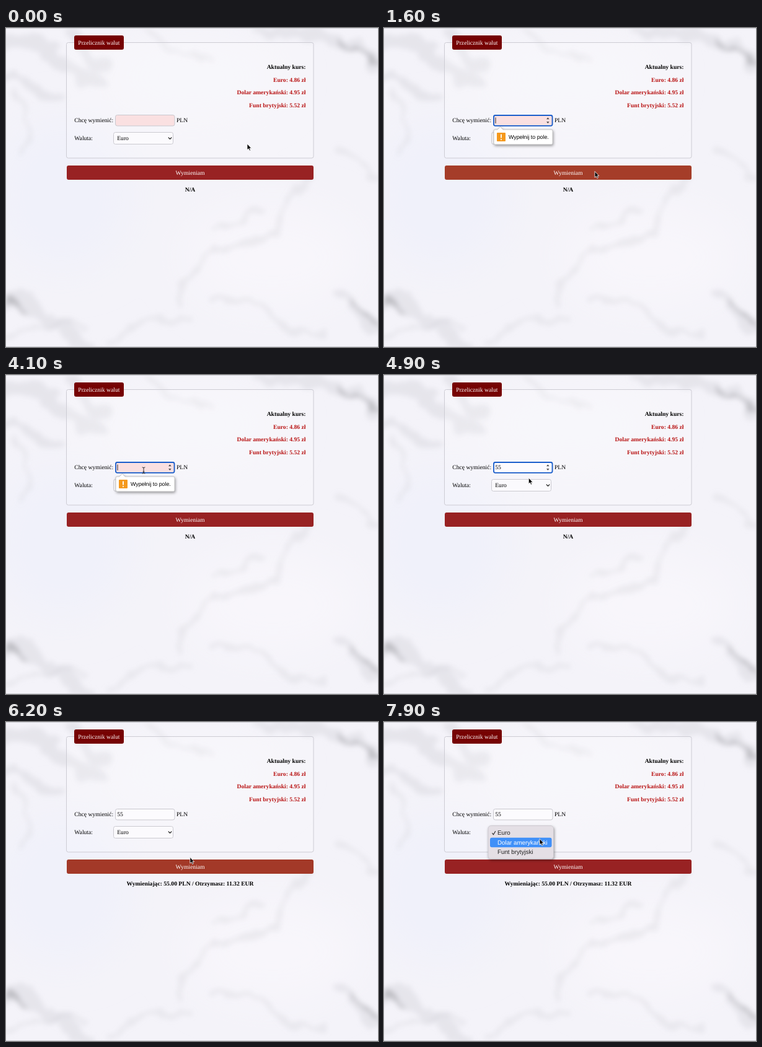
Write an HTML page that moves like this. It is 600 px wide and 515 px high and loops after 8000 ms.

```html
<!DOCTYPE html>
<html lang="pl">
<head>
<meta charset="utf-8">
<title>Przelicznik walut</title>
<style>
html, body { margin: 0; width: 100%; height: 100%; overflow: hidden; background: #f4f3f9; }
svg { display: block; width: 600px; height: 515px; }
text { font: 9.65px "Liberation Serif", "Times New Roman", serif; text-rendering: geometricPrecision; white-space: pre; }
.bold { font-weight: bold; }
.end { text-anchor: end; }
.mid { text-anchor: middle; }
.rate { fill: #b91515; }
.light { fill: #fff; }
.sans { font-family: "Liberation Sans", Arial, sans-serif; }
.line { fill: none; stroke: #222; stroke-linecap: round; stroke-linejoin: round; }
</style>
</head>
<body>
<svg viewBox="0 0 600 515">
  <defs>
    <filter id="marble" filterUnits="userSpaceOnUse" x="-30" y="-30" width="660" height="575">
      <feTurbulence type="fractalNoise" baseFrequency=".025" numOctaves="3" seed="4"/>
      <feDisplacementMap in="SourceGraphic" scale="38" xChannelSelector="R" yChannelSelector="G"/>
      <feGaussianBlur stdDeviation="4"/>
    </filter>
    <filter id="soft" x="-50%" y="-50%" width="200%" height="200%"><feGaussianBlur stdDeviation="35"/></filter>
    <filter id="shadow" x="-20%" y="-20%" width="140%" height="150%">
      <feDropShadow dx="1" dy="2" stdDeviation="2" flood-opacity=".4"/>
    </filter>
  </defs>

  <g filter="url(#soft)">
    <ellipse cx="90" cy="270" rx="110" ry="120" fill="#f0f1fa"/>
    <ellipse cx="430" cy="370" rx="140" ry="80" fill="#f8f6fb"/>
    <ellipse cx="300" cy="80" rx="140" ry="60" fill="#f6f5fa"/>
  </g>
  <g filter="url(#marble)" fill="none" stroke="#bdbdc4" stroke-linecap="round">
    <g stroke-width="20" opacity=".25">
      <path d="M0 25Q40 10 75 45T150 85M100 0L155 65M0 80L90 110"/>
      <path d="M410 5Q480 8 530 18T600 60"/>
      <path d="M0 445Q30 430 60 460T135 515M530 430Q560 440 600 490"/>
    </g>
    <g stroke-width="9" opacity=".22">
      <path d="M500 235Q465 260 450 300T380 350T300 395T280 450"/>
      <path d="M540 195Q560 215 600 245M330 440Q400 430 430 465T510 490"/>
      <path d="M170 500Q230 460 290 470M10 110Q50 140 25 200M220 0Q250 40 330 50"/>
      <path d="M0 500Q60 475 120 480M340 330L400 300"/>
    </g>
    <g stroke="#96969a" stroke-width="6" opacity=".5">
      <path d="M535 17Q560 30 605 58M555 440Q575 455 605 480M5 440L35 455"/>
    </g>
  </g>
  <path d="M0 .5H600M0 514.5H600" stroke="#cfcfd5"/>

  <rect x="97.5" y="23.5" width="398.5" height="186.5" rx="3" fill="#fff" fill-opacity=".15" stroke="#cdccd4"/>
  <rect x="110" y="12" width="80" height="23" rx="3" fill="#760202"/>
  <text class="light" x="116.3" y="27">Przelicznik walut</text>
  <text class="bold end" x="483.5" y="66">Aktualny kurs:</text>
  <text class="bold end rate" x="483.5" y="86.5">Euro: 4.86 zł</text>
  <text class="bold end rate" x="483.5" y="107">Dolar amerykański: 4.95 zł</text>
  <text class="bold end rate" x="483.5" y="128">Funt brytyjski: 5.52 zł</text>
  <text x="110.3" y="152.3">Chcę wymienić:</text>
  <text x="275" y="152.3">PLN</text>
  <text x="110.3" y="181.3">Waluta:</text>

  <rect id="field" x="176.5" y="140.5" width="95.5" height="17.5" rx="3" stroke="#c9c8ce"/>
  <g id="focus">
    <rect x="177" y="141" width="94.5" height="16.8" rx="2.5" fill="none" stroke="#1b5fcc" stroke-width="1.8"/>
    <path d="M262 147.3L264.3 144.6L266.6 147.3ZM262 151.2L264.3 153.9L266.6 151.2Z" fill="#444"/>
  </g>
  <text id="amount" x="179.3" y="152.3"></text>
  <path id="caret" d="M0 144.5V154" stroke="#111" stroke-width=".9"/>

  <rect x="173.5" y="168.5" width="96" height="19" rx="3" fill="#fbfafd" stroke="#cbcad0"/>
  <text x="179.2" y="181.3">Euro</text>
  <path class="line" d="M262.2 177L264.5 179.3L266.8 177" stroke-width="1.2"/>

  <rect id="button" x="98" y="222" width="398" height="23" rx="3"/>
  <text class="light mid" x="297" y="237">Wymieniam</text>
  <text id="result" class="bold mid" x="297" y="263.5"></text>

  <g id="tip">
    <path d="M179 164H183L187.5 159.3L192 164H270Q272 164 272 166V186Q272 188 270 188H179Q177 188 177 186V166Q177 164 179 164Z"
      fill="#fff" stroke="#aaa" stroke-width=".7" filter="url(#shadow)"/>
    <rect x="182" y="169" width="14" height="14" rx="1" fill="#f5991d"/>
    <path d="M189 171.5V177.5M189 179.2V181" stroke="#fff" stroke-width="1.8"/>
    <text class="sans" x="201" y="179" style="font-size:8.86px">Wypełnij to pole.</text>
  </g>

  <g id="menu">
    <rect x="168" y="167.5" width="105.5" height="53.5" rx="4.5" fill="#e4dfe5" stroke="#bdb9c0" stroke-width=".6" filter="url(#shadow)"/>
    <rect id="mark" x="171" width="99.5" height="15.5" rx="3" fill="#4090f8"/>
    <path id="check" class="line" d="M174.8 179.5L176.5 181.8L179.6 176.5" stroke-width="1.1"/>
    <g id="items"></g>
  </g>

  <circle id="ring" r="13.3" fill="none" stroke="#151515" stroke-width="1.1"/>
  <path id="arrow" d="M0 0V9.8L2.2 7.8L3.8 11.2L5.4 10.4L3.9 7.2H6.8Z" fill="#000" stroke="#fff" stroke-width=".8"/>
  <path id="beam" class="line" d="M-2 -5Q0 -5 0 -3.8Q0 -5 2 -5M0 -4V4M-2 5Q0 5 0 3.8Q0 5 2 5M-1 2H1" stroke-width=".9"/>
</svg>
<script>
const $ = id => document.getElementById(id);
const show = (id, on) => $(id).setAttribute('opacity', +on);
const within = (t, a, b) => t >= a && t < b;

const BASE = [152, 34, 35], HOVER = [165, 61, 41], ACTIVE = [205, 80, 52];
const buttonKeys = [
  [0, BASE], [300, BASE], [500, HOVER], [600, ACTIVE], [700, ACTIVE], [800, HOVER],
  [2800, HOVER], [3200, BASE], [4900, BASE], [5200, HOVER], [5400, HOVER],
  [5500, ACTIVE], [5600, ACTIVE], [5700, HOVER], [6100, HOVER], [6500, BASE]
];
const mouseKeys = [
  [0, [389, 187]], [500, [340, 231.5]], [2800, [340, 231.5]], [3200, [293, 226]],
  [3400, [293, 226]], [3800, [222, 154]], [4800, [222, 154]], [5200, [294, 230.5]],
  [6000, [294, 230.5]], [6500, [302, 196]], [6600, [302, 196]], [6900, [254, 175.5]],
  [7500, [254, 175.5]], [7900, [251, 188.5]]
];

function track(keys, t) {
  const i = keys.findIndex(k => k[0] > t);
  if (i < 0) return keys.at(-1)[1];
  const [t0, a] = keys[i - 1], [t1, b] = keys[i];
  const p = (t - t0) / (t1 - t0), e = p * p * (3 - 2 * p);
  return a.map((v, n) => v + (b[n] - v) * e);
}

const items = ['Euro', 'Dolar amerykański', 'Funt brytyjski'].map((name, i) => {
  const text = document.createElementNS('http://www.w3.org/2000/svg', 'text');
  text.textContent = name;
  text.setAttribute('class', 'sans');
  text.setAttribute('x', 183);
  text.setAttribute('y', 181.8 + i * 15.8);
  text.style.fontSize = '9.75px';
  return $('items').appendChild(text);
});

function draw(t) {
  const [x, y] = track(mouseKeys, t);
  const amount = t < 4400 ? '' : t < 4700 ? '5' : '55';
  const focused = within(t, 800, 5500);
  const inField = within(x, 177, 272) && within(y, 141, 158);
  const place = `translate(${x} ${y})`;

  $('field').setAttribute('fill', amount ? '#fcfbfe' : '#fae0e1');
  $('amount').textContent = amount;
  show('focus', focused);
  $('caret').setAttribute('transform', `translate(${180 + amount.length * 4.85})`);
  show('caret', focused && within(t % 1000, 100, 650));
  show('tip', t < 4300 ? Math.min(1, Math.max(0, (t - 1000) / 300)) : Math.max(0, (4500 - t) / 300));

  $('button').setAttribute('fill', `rgb(${track(buttonKeys, t).map(Math.round)})`);
  $('result').textContent = t < 5600 ? 'N/A' : 'Wymieniając: 55.00 PLN / Otrzymasz: 11.32 EUR';

  const row = t < 7700 ? 0 : 1;
  show('menu', t >= 7200);
  $('mark').setAttribute('y', 171 + row * 15.8);
  $('check').style.stroke = row ? '#222' : '#fff';
  items.forEach((item, i) => item.setAttribute('fill', i === row ? '#fff' : '#222'));

  for (const id of ['arrow', 'beam', 'ring']) $(id).setAttribute('transform', place);
  show('arrow', !inField);
  show('beam', inField);
  show('ring', within(t, 600, 800) || within(t, 5500, 5700) || within(t, 7000, 7200));
}

let start;
function tick(now) {
  start ??= now;
  draw(Math.floor((now - start + 2) / 100) * 100 % 8000);
  requestAnimationFrame(tick);
}
draw(0);
requestAnimationFrame(tick);
</script>
</body>
</html>
```
